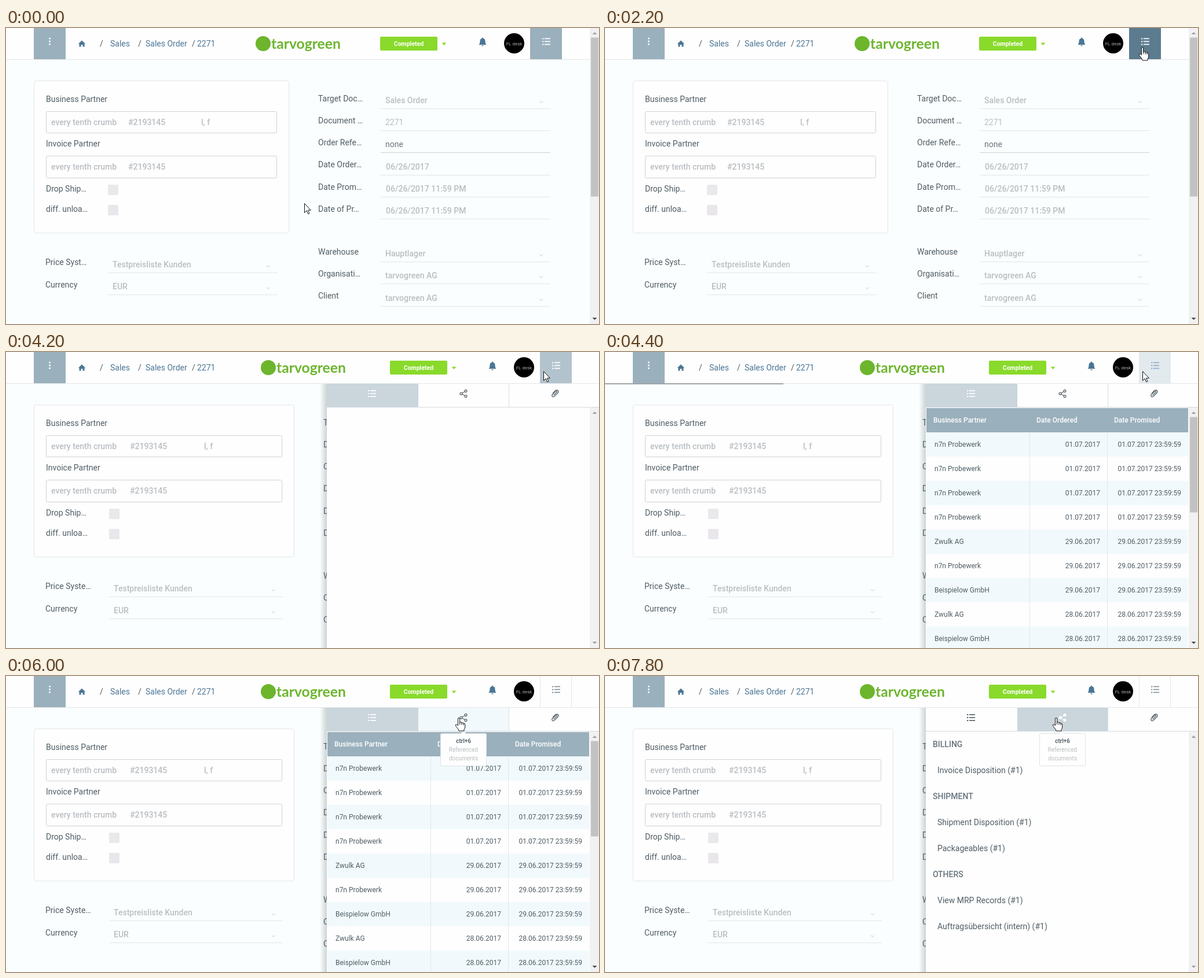
Animation of 1024 by 512 pixels, one loop 8000 ms. Source, as an HTML page:

```html
<!DOCTYPE html>
<html lang="en">
<head>
<meta charset="utf-8">
<title>Sales order</title>
<style>
html, body { margin: 0; width: 100%; height: 100%; overflow: hidden; background: #fbfefe; }
svg { display: block; width: 1024px; height: 512px; font-family: Roboto, sans-serif; }
text { white-space: pre; }
</style>
</head>
<body>
<svg id="stage" viewBox="0 0 1024 512"></svg>
<script>
const LOOP = 8000, STEP = 200;
const INK = '#505d65', MUTED = '#b9bec2', BLUE = '#4b7695', STEEL = '#9ab0bc', LINE = '#e2e6e8', TAB = '#cad5dc';
const stage = document.getElementById('stage');

const rect = (x, y, w, h, fill, extra = '') =>
  `<rect x="${x}" y="${y}" width="${w}" height="${h}" fill="${fill}" ${extra}/>`;
const box = (x, y, w, h, stroke, r = 2, fill = '#fefefe') =>
  rect(x + .5, y + .5, w - 1, h - 1, fill, `rx="${r}" stroke="${stroke}"`);
const path = (d, stroke, width = 1, fill = 'none', extra = '') =>
  `<path d="${d}" fill="${fill}" stroke="${stroke}" stroke-width="${width}" ${extra}/>`;
const dot = (x, y, r, fill, extra = '') => `<circle cx="${x}" cy="${y}" r="${r}" fill="${fill}" ${extra}/>`;
const label = (x, y, str, fill = INK, size = 14, weight = 400, anchor = 'start') =>
  `<text x="${x}" y="${y}" fill="${fill}" font-size="${size}" font-weight="${weight}" text-anchor="${anchor}">${str}</text>`;
const value = (x, y, str) => label(x, y, str, MUTED, 14, 500);
const chevron = (x, y) => path(`M${x - 3} ${y - 1.5}l3 3l3-3`, '#c3c8cb');
const at = (x, y, body) => `<g transform="translate(${x} ${y})">${body}</g>`;

const listIcon = (x, y, color) => [-5, 0, 5].map(d =>
  rect(x - 7, y + d - 1, 2.4, 2, color) + rect(x - 3, y + d - 1, 10, 1.7, color)).join('');
const shareIcon = (x, y, color) => path(`M${x + 4} ${y - 4.5}L${x - 4} ${y}L${x + 4} ${y + 4.5}`, color, 1.2) +
  [[-4, 0], [4, -4.6], [4, 4.6]].map(([a, b]) =>
    dot(x + a, y + b, 1.9, '#fefefe', `stroke="${color}" stroke-width="1.3"`)).join('');
const clipIcon = (x, y, color) => at(x, y, path(
  'M-2.5 3L3 -2.5Q4 -4 3 -4.5Q2 -5 1 -4L-4.5 1.5Q-6 3.5 -4.5 5Q-3 6.4 -1 4.8L5 -1.2Q7 -4 5 -5.6Q3 -7 .5 -5L-4 -.5', color, 1.3));

// Cursor: start time, tip x, tip y, hand shape
const moves = [
  [0, 515, 303], [600, 568, 296], [800, 654, 278], [1000, 774, 219], [1200, 838, 185],
  [1600, 911, 113, 1], [1800, 926, 57], [2000, 928, 37, 1], [2200, 928, 33, 1], [4000, 928, 33],
  [4600, 926, 35], [4800, 900, 62, 1], [5000, 868, 72, 1], [5200, 812, 74, 1], [5400, 782, 72, 1], [7800, 779, 72, 1]
];
const lastOf = (keys, t) => keys.filter(k => k[0] <= t).pop();

function cursor([, x, y, hand]) {
  const arrow = 'M.5 .5V16.5L4.2 13L6.8 18.8L9 17.8L6.5 12.2H11.4Z';
  const palm = 'M-1.5 13.5V2Q-1.5 .5 0 .5Q1.6 .5 1.6 2V8Q4.4 6.6 4.9 9Q7.4 7.6 8 10Q10.7 9.2 10.7 12V16Q10.5 19 9 20.5V23H0Q-.2 20.5 -3 17.5Q-6.4 13.5 -5.4 12.2Q-4 11 -1.5 13.5Z';
  return at(x, y, path(hand ? palm : arrow, '#111', 1, '#fff') +
    (hand ? path('M1.6 8V12M4.9 9V12.5M8 10V13', '#111') : ''));
}

function scrollbar(top, thumb, upColor, downColor) {
  return rect(1008, top, 16, 512 - top, '#f1f1f2') +
    (thumb ? rect(1010, top + 16.5, 13, thumb, '#c2c2c2') : '') +
    path(`M1012.5 ${top + 11}h8l-4-4z`, 'none', 0, upColor) +
    path('M1012.5 501h8l-4 4z', 'none', 0, downColor);
}

function tooltip(x, y, h, key, body) {
  return box(x - 40, y, 80, h, '#dfe3e6') +
    path(`M${x - 5} ${y + 1}l5-5l5 5`, '#dfe3e6', 1, '#fefefe') +
    label(x, y + 17, key, '#5f6a71', 10, 700, 'middle') + body;
}

function header(t, open) {
  const mid = open ? 9 : 0, side = open ? 17 : 0;
  const x = 905 + side;
  const [, fill, icon] = lastOf([
    [0, STEEL, '#fff'], [2000, '#7892a3', '#fff'], [2200, '#5c7b8f', '#fff'],
    [4200, '#b3c3cd', '#fff'], [4400, '#e2eaee', '#8fabc6'], [4800, '#fefefe', '#87939a']], t);
  let s = rect(0, 0, 1024, 54, '#fefefe') + rect(0, 54, 1024, 1, LINE) + rect(48, 0, 55, 54, STEEL);
  s += [18, 23, 28].map(y => dot(75.5, y, 1.6, '#fff')).join('');
  s += path('M124.8 27.5L131 21.5L137.2 27.5H135.5V32.5H132.5V29H129.5V32.5H126.5V27.5Z', 'none', 0, BLUE);
  s += label(162, 32, '/') + label(180, 32, 'Sales', BLUE) + label(228, 32, '/') +
    label(241, 32, 'Sales Order', BLUE) + label(321, 32, '/') + label(330, 32, '2271', BLUE);
  s += dot(444 + mid, 27, 13, '#6cb52d') +
    `<text x="${458 + mid}" y="36" font-size="24.7" font-weight="700" fill="#6cb52d" font-family="Lato, sans-serif">tarvogreen</text>`;
  s += at(side, 0, rect(646, 15, 99, 24, '#89da2b', 'rx="2"') +
    label(695.5, 31, 'Completed', '#fff', 10.5, 700, 'middle') +
    path('M752.5 25.5h8l-4 4.5z', 'none', 0, '#89da2b') +
    path('M816.5 29Q818.5 27 818.5 23Q818.5 18.5 822 18V16.8H824V18Q827.5 18.5 827.5 23Q827.5 27 829.5 29ZM821 30h4q-2 3-4 0z', 'none', 0, BLUE) +
    dot(877.5, 26.5, 17.5, '#000') + label(877.5, 30, 'FL desk', '#aaa', 8, 400, 'middle'));
  s += rect(x, 0, 55, 54, fill);
  if (t >= 4800) s += path(`M${x + .5} 0V54M${x + 54.5} 0V54`, LINE);
  return s + listIcon(x + 28, 23.5, icon);
}

function form(open) {
  const w = open ? 9 : 0, nudge = open ? 3 : 0, fx = open ? 178 : 176;
  const right = fx + (open ? 300 : 293), rx = 539 + w;
  const partner = 'every tenth crumb', company = 'tarvogreen AG';
  let s = box(48, 91, 441 + w, 264, LINE, 3);
  s += label(69, 128, 'Business Partner') + label(69, 205, 'Invoice Partner');
  for (const y of [144, 221]) {
    s += box(69, y, 399 + w, y === 144 ? 38 : 39, '#cdd2d5') +
      value(78, y + 24, partner) + value(211 + nudge, y + 24, '#2193145');
  }
  s += value(open ? 342 : 337, 168, 'l, f');
  s += label(69, 283, 'Drop Ship…') + label(69, 318, 'diff. unloa…') +
    rect(fx, 271, 18, 18, '#e9e9ec', 'rx="2"') + rect(fx, 306, 18, 18, '#e9e7eb', 'rx="2"');
  [[410, open ? 'Price Syste…' : 'Price Syst…', 'Testpreisliste Kunden'], [449, 'Currency', 'EUR']].forEach(([y, name, val], i) => {
    const line = 423 + 38 * i;
    s += label(68, y, name) + value(fx + 8, line - 9, val) +
      rect(fx, line, right - fx, 1, LINE) + chevron(right - 16, line - 11);
  });
  const rows = [
    [127, 'Target Doc…', 'Sales Order', 1], [165, 'Document …', '2271'], [203, 'Order Refe…', 'none'],
    [241, 'Date Order…', '06/26/2017'], [280, 'Date Prom…', '06/26/2017 11:59 PM'],
    [318, 'Date of Pr…', '06/26/2017 11:59 PM'], [392, 'Warehouse', 'Hauptlager', 1],
    [430, 'Organisati…', company, 1], [468, 'Client', company, 1]];
  for (const [y, name, val, select] of rows) {
    const line = y + (y === 241 || y === 468 ? 13 : 12), active = val === 'none';
    s += label(rx, y, name);
    if (open) continue;
    s += val === '2271' || active ? label(655, line - 9, val, active ? '#6a757c' : MUTED)
      : value(val[0] === '0' ? 656 : 655, line - 9, val);
    s += rect(647, line, 293, 1, active ? '#cbd1d4' : LINE) + (select ? chevron(924, line - 11) : '');
  }
  return s;
}

function orderTable() {
  const [a, b, c] = ['n7n Probewerk', 'Zwulk AG', 'Beispielow GmbH'];
  let s = rect(555, 97, 452, 42, STEEL);
  [[567, 'Business Partner'], [745, 'Date Ordered'], [879, 'Date Promised']].forEach(([x, str]) => {
    s += label(x, 122, str, '#fff', 12, 500);
  });
  [a, a, a, a, b, a, c, b, c].forEach((name, i) => {
    const y = 139 + 42 * i, date = (i < 4 ? '01.07' : i < 7 ? '29.06' : '28.06') + '.2017';
    s += rect(555, y, 452, 42, i % 2 ? '#fefefe' : '#f1f9fc') + label(569, y + 25, name, INK, 12) +
      label(855, y + 25, date, INK, 12, 400, 'end') + label(995, y + 25, date + ' 23:59:59', INK, 12, 400, 'end');
  });
  return s + rect(733, 139, 1, 373, '#e1e8ec') + rect(867, 139, 1, 373, '#e1e8ec');
}

function references() {
  const head = (y, str) => label(566, y, str, '#66757e', 14, 500);
  const item = (y, str) => label(574, y, str + ' (#1)');
  return head(123, 'BILLING') + item(168, 'Invoice Disposition') + head(213, 'SHIPMENT') +
    item(258, 'Shipment Disposition') + item(303, 'Packageables') + head(348, 'OTHERS') +
    item(393, 'View MRP Records') + item(438, 'Auftragsübersicht (intern)');
}

function sidePanel(t, pointer) {
  const active = t < 7200 ? 0 : 1, loaded = t >= 4400 && !active;
  const tabs = [[554, 158], [712, 157], [869, 155]];
  const icons = [listIcon, shareIcon, clipIcon];
  let s = rect(542, 55, 12, 457, 'url(#shade)') + rect(554, 55, 470, 457, '#fefefe');
  tabs.forEach(([x, w], i) => {
    const hover = pointer[2] > 55 && pointer[1] >= x && pointer[1] < x + w;
    s += rect(x, 55, w, 40, i === active ? TAB : hover ? '#f1f9fc' : '#fefefe');
    s += icons[i]([632, 790, 948][i], 72, i === active ? '#fff' : '#59666e');
  });
  s += rect(868, 55, 1, 40, '#d9dfe2') + rect(554, 95, 470, 1, '#d5dbdf');
  s += scrollbar(96, loaded ? 165 : 0, '#a3a3a3', loaded ? '#505050' : '#a3a3a3');
  if (loaded) s += orderTable();
  if (t >= 7400) s += references();
  return s;
}

function progress(t) {
  if (t < 4400 || t >= 5400) return '';
  return rect(0, 54, t < 5000 ? 308 : 1024, 2, '#a0a5a8', t < 5200 ? '' : 'opacity=".4"');
}

const defs = `<defs><linearGradient id="shade"><stop stop-color="#566" stop-opacity="0"/><stop offset="1" stop-color="#566" stop-opacity=".28"/></linearGradient>
<clipPath id="page"><path d="M0 0H1008V512H0Z"/></clipPath></defs>`;

function scene(t) {
  const open = t >= 4200, pointer = lastOf(moves, t);
  let s = defs + rect(0, 0, 1024, 512, '#fbfefe') + form(open) + header(t, open);
  if (open) s += sidePanel(t, pointer) + progress(t);
  else s += scrollbar(0, 275, '#a3a3a3', '#505050');
  if (t >= 3000 && !open) {
    s += `<g clip-path="url(#page)">${tooltip(933, 59, 42, 'ctrl+5',
      label(898, 91, 'mainScreen.sideList.tooltip', MUTED, 10))}</g>`;
  }
  if (t >= 6000) {
    s += tooltip(790, 99, 57, 'ctrl+6', label(790, 131, 'Referenced', MUTED, 10, 400, 'middle') +
      label(790, 146, 'documents', MUTED, 10, 400, 'middle'));
  }
  return s + cursor(pointer);
}

let shown = -1;
function draw(now) {
  const t = Math.floor(now % LOOP / STEP) * STEP;
  if (t !== shown) stage.innerHTML = scene(shown = t);
  requestAnimationFrame(draw);
}
draw(performance.now());
</script>
</body>
</html>
```
